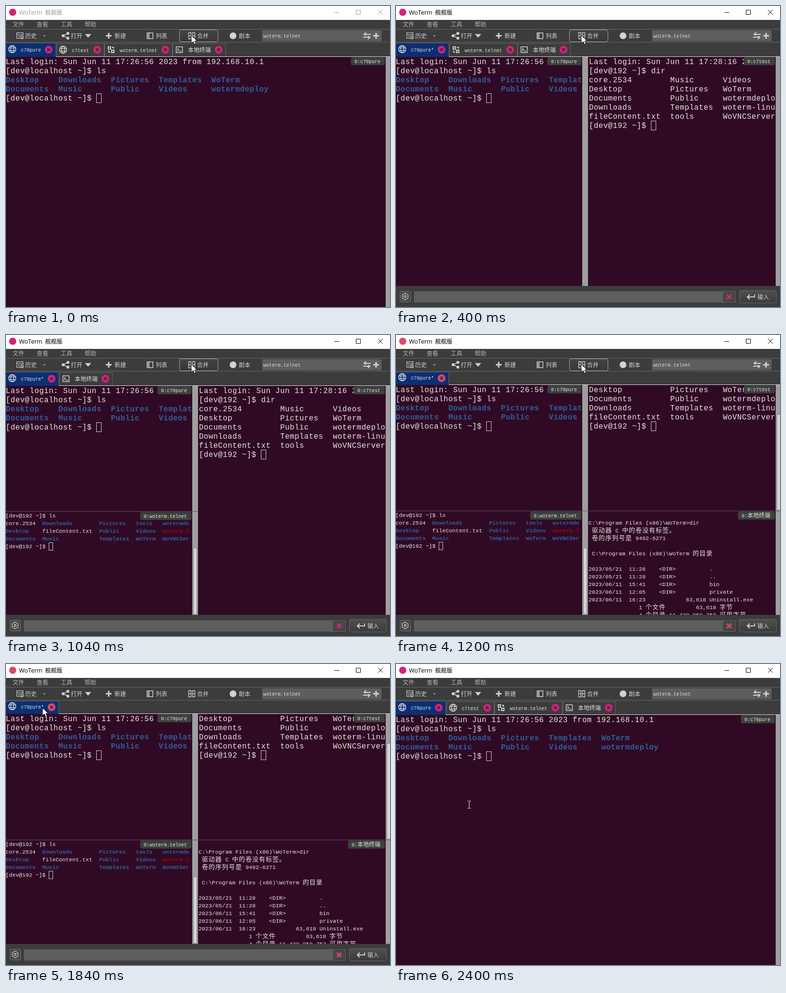
An HTML page with a canvas for the animation above (2800 ms loop, 800 by 627 pixels).

```html
<!DOCTYPE html>
<html lang="zh-CN">
<head>
<meta charset="utf-8">
<title>WoTerm</title>
<style>
html, body { margin: 0; width: 100%; height: 100%; overflow: hidden; background: #3c3c3c; }
canvas { display: block; }
</style>
</head>
<body>
<canvas id="stage" width="800" height="627"></canvas>
<script>
const ctx = document.getElementById('stage').getContext('2d');
const SANS = '"Noto Sans CJK SC", "Noto Sans CJK", sans-serif';
const MONO = '"Liberation Mono", monospace';
const PANEL = '#3c3c3c', EDGE = '#666', INK = '#d2d2d2', NAVY = '#0c2f72';
const TERM = '#300a24', WHITE = '#e6e2e4', BLUE = '#305e9c', BAR = '#9f9f9f';
const STEP = 400, STEPS = 7;
const BIG = { cell: 9.96, size: 15.8, line: 19 };
const SMALL = { cell: 6.96, size: 11.6, line: 16 };
const SHELL = { cell: 7, size: 11.6, line: 16 };
const TINY = { cell: 6, size: 10, line: 12 };
let accent;

// ---- primitives ----
function rect(x, y, w, h, color) {
  ctx.fillStyle = color;
  ctx.fillRect(x, y, w, h);
}
function frame(x, y, w, h, color, width = 1) {
  ctx.strokeStyle = color;
  ctx.lineWidth = width;
  ctx.strokeRect(x + .5, y + .5, w - 1, h - 1);
}
function box(x, y, w, h, r, fill, edge) {
  ctx.beginPath();
  ctx.roundRect(x + .5, y + .5, w - 1, h - 1, r);
  ctx.fillStyle = fill;
  ctx.fill();
  if (edge) { ctx.strokeStyle = edge; ctx.lineWidth = 1; ctx.stroke(); }
}
function shade(y, h, top, bottom) {
  const g = ctx.createLinearGradient(0, y, 0, y + h);
  g.addColorStop(0, top);
  g.addColorStop(1, bottom);
  return g;
}
function path(d, x, y, color = INK, width = 1.5) {
  ctx.save();
  ctx.translate(x, y);
  ctx.strokeStyle = color;
  ctx.lineWidth = width;
  ctx.stroke(new Path2D(d));
  ctx.restore();
}
function shape(d, x, y, color = INK) {
  ctx.save();
  ctx.translate(x, y);
  ctx.fillStyle = color;
  ctx.fill(new Path2D(d));
  ctx.restore();
}
function disc(x, y, r, color) {
  ctx.beginPath();
  ctx.arc(x, y, r, 0, 7);
  ctx.fillStyle = color;
  ctx.fill();
}
function label(text, x, y, color = INK, font = '12px ' + SANS) {
  ctx.font = font;
  ctx.fillStyle = color;
  ctx.fillText(text, x, y);
}
// Character grid: CJK characters take two cells.
function grid(text, x, y, type, color = WHITE, bold = false) {
  ctx.fillStyle = color;
  for (const ch of text) {
    const wide = ch > '\u2e7f';
    ctx.font = wide ? `${type.cell * 2 - (type === TINY ? 0 : 1)}px ${SANS}`
                    : `${bold ? 'bold ' : ''}${type.size}px ${MONO}`;
    ctx.fillText(ch, x, y);
    x += type.cell * (wide ? 2 : 1);
  }
}
function clipped(x, y, w, h, draw) {
  ctx.save();
  ctx.beginPath();
  ctx.rect(x, y, w, h);
  ctx.clip();
  rect(x, y, w, h, TERM);
  draw();
  ctx.restore();
}

// ---- icons, centred on x, y ----
const icons = {
  globe(x, y) {
    path('M-7.5 0A7.5 7.5 0 1 0 7.5 0A7.5 7.5 0 1 0 -7.5 0M-7 -2.7H7M-7 2.7H7M0 -7.5C-4.5 -4 -4.5 4 0 7.5C4.5 4 4.5 -4 0 -7.5', x, y, '#e0e0e0', 1.3);
  },
  link(x, y) {
    path('M-6 -6H-1V-1H-6ZM1 1H6V6H1ZM2 -5H5V-2M-5 2V5H-2', x, y, INK, 2);
  },
  shell(x, y) {
    path('M-6.5 -6H6.5V6H-6.5ZM-4 -3L-1 0L-4 3M0 3H4', x, y);
  },
  plus(x, y) { path('M-6 0H6M0 -6V6', x, y, INK, 3); },
  merge(x, y) {
    path('M-1.5 -6.5H-6.5V6.5H-1.5ZM1.5 -6.5H6.5V6.5H1.5ZM-6 0H-2M6 0H2', x, y, INK, 1.3);
  },
  split(x, y) {
    path('M-6.5 -6.5H-2V6.5H-6.5M6.5 -6.5H2V6.5H6.5M-7 0H-2M7 0H2', x, y, INK, 1.3);
  }
};
function closeButton(x, y) {
  disc(x, y, 8, accent);
  path('M-3 -3L3 3M3 -3L-3 3', x, y, '#3b2434', 1.8);
}

// ---- window chrome ----
function titleBar(active) {
  const ink = active ? '#000' : '#999';
  rect(0, 0, 800, 29, '#fff');
  disc(14, 13, 7.5, accent);
  label('WoTerm', 27, 18, ink, '12.5px "Open Sans", sans-serif');
  label('舰舰版', 81.5, 18, ink);
  path('M684 13.5H694M729.5 8.5H738.5V17.5H729.5ZM775 8L785 18M785 8L775 18', 0, 0, ink, 1);
}
function toolBar(hover) {
  rect(0, 29, 800, 77, PANEL);
  ['文件', '查看', '工具', '帮助'].forEach((s, i) => label(s, 14 + 50 * i, 43, '#b4b4b4'));
  rect(0, 48, 800, 1, EDGE);
  rect(0, 75, 800, 1, EDGE);
  if (hover) box(361, 49, 81, 26, 3, shade(49, 26, '#444', '#363636'), '#aaa');

  path('M6 5.5H-6.5V-6.5H6.5V-1M-6.5 -3H6.5M-4 0H0M-4 3H-1M1 3A3.3 3.3 0 1 0 7.6 3A3.3 3.3 0 1 0 1 3M4 1V3.5H6', 29, 62, INK, 1.2);
  shape('M-3 -1H3L0 2Z', 80, 62, '#999');
  path('M5 -5L-5 0L5 5', 124, 62);
  [[119, 62], [129, 57], [129, 67]].forEach(([x, y]) => disc(x, y, 3, INK));
  shape('M-6.5 -3.5H6.5L0 4Z', 171, 62);
  icons.plus(214, 62);
  path('M-6 -6H6V6H-6ZM-2 -6V6M-5 -3H-3M-5 0H-3M-5 3H-3', 300, 62);
  icons.merge(387, 62);
  disc(473, 62, 7, INK);
  [['历史', 40], ['打开', 135], ['新建', 226], ['列表', 312], ['合并', 398], ['剧本', 485]]
    .forEach(([s, x]) => label(s, x, 66.5));

  box(533, 50, 250, 24, 2, '#5e5e5e');
  grid('woterm.telnet', 536, 66, TINY, '#ddd');
  path('M16 -3H2M6 -7L2 -3L6 -1M0 3H14M10 1L14 3L10 7', 744, 62, INK, 2);
  icons.plus(771, 62);
}
function tabs(list, bottom) {
  let x = 0;
  rect(0, bottom, 800, 1, '#e0e0e0');
  list.forEach(([text, icon, w], i) => {
    const y = bottom - (i ? 14 : 15);
    if (i) {
      rect(x, 78, w, bottom - 78, PANEL);
      path(`M.5 ${bottom}V78.5H${w - .5}V${bottom}`, x, 0, EDGE, 1);
    } else {
      rect(0, 77, w, bottom - 76, NAVY);
      path(`M0 77.5H${w - .5}V${bottom}`, 0, 0, '#4c5c7c', 1);
    }
    icons[icon](x + (i ? 14 : 13), y);
    grid(text, x + (i ? 32 : 31), y + (i ? 5 : 4.5), TINY, '#e2e2e2');
    closeButton(x + w - 15, bottom - (bottom < 105 ? 13 : 14));
    x += w + (i ? 0 : 1);
  });
}
function badge(text, x, right, y) {
  box(x, y, right - x, 18, 4, '#3c403c');
  grid(text, x + 8, y + 13, TINY, '#e6e6e6');
}
function inputPanel() {
  rect(0, 583, 800, 44, PANEL);
  box(8, 594, 23, 23, 2, '#484848', '#777');
  path('M0 -7L6 -3.5V3.5L0 7L-6 3.5V-3.5ZM-2 0A2 2 0 1 0 2 0A2 2 0 1 0 -2 0', 19, 605, INK, 1.3);
  box(37, 594, 671, 24, 2, '#5e5e5e', '#555');
  box(682, 596, 24, 20, 2, '#484848', '#2c2c2c');
  path('M-4.5 -4.5L4.5 4.5M4.5 -4.5L-4.5 4.5', 694, 606, accent, 3);
  box(715, 592, 78, 27, 2, shade(592, 27, '#505050', '#3a3a3a'), '#666');
  path('M16 -5V0H1M6 -5L1 0L6 5', 731, 606, INK, 2);
  label('输入', 753, 611);
}

// ---- terminals ----
function listing(rows, cols, x, y, type, style) {
  rows.forEach((row, r) => row.split(' ').forEach((word, c) => {
    const color = style(word);
    grid(word, x + cols[c] * type.cell, y + r * type.line, type, color, color !== WHITE);
  }));
}
function prompt(host, x, y, type, command) {
  const text = `[dev@${host} ~]$ `;
  grid(text + (command || ''), x, y, type);
  if (!command) {
    const big = type === BIG;
    frame(Math.floor(x + text.length * type.cell), y - (big ? 15 : 12), big ? 11 : 9, big ? 20 : 17, '#d8d0d6');
  }
}
function homePane(w, top, h) {
  clipped(0, top, w, h, () => {
    const x = -.5, y = top + 15;
    grid('Last login: Sun Jun 11 17:26:56 2023 from 192.168.10.1', x, y, BIG);
    prompt('localhost', x, y + 19, BIG, 'ls');
    listing(['Desktop Downloads Pictures Templates WoTerm', 'Documents Music Public Videos wotermdeploy'],
      [0, 11, 22, 32, 43], x, y + 38, BIG, () => BLUE);
    prompt('localhost', x, y + 76, BIG);
  });
}
function dirPane(top, h, scrolledRows) {
  clipped(400, top, 391, h, () => {
    const x = 402, y = top + 15 - 19 * scrolledRows;
    grid('Last login: Sun Jun 11 17:28:16 2023', x, y, BIG);
    prompt('192', x, y + 19, BIG, 'dir');
    listing(['core.2534 Music Videos', 'Desktop Pictures WoTerm', 'Documents Public wotermdeploy',
      'Downloads Templates woterm-linux', 'fileContent.txt tools WoVNCServer'],
      [0, 17, 28], x, y + 38, BIG, () => WHITE);
    prompt('192', x, y + 133, BIG);
  });
}
function telnetPane(top) {
  const plain = ['core.2534', 'fileContent.txt'];
  clipped(0, top, 388, 583 - top, () => {
    const y = top + 12;
    prompt('192', -1, y, SMALL, 'ls');
    listing(['core.2534 Downloads Pictures tools wotermde', 'Desktop fileContent.txt Public Videos woterm-l',
      'Documents Music Templates WoTerm WoVNCSer'], [0, 11, 28, 39, 47], -1, y + 16, SMALL,
      word => plain.includes(word) ? WHITE : word === 'woterm-l' ? '#a40014' : BLUE);
    prompt('192', -1, y + 64, SMALL);
  });
}
const DIR_OUTPUT = `C:\\Program Files (x86)\\WoTerm>dir
 驱动器 C 中的卷没有标签。
 卷的序列号是 9492-6271

 C:\\Program Files (x86)\\WoTerm 的目录

2023/05/21  11:28    <DIR>          .
2023/05/21  11:28    <DIR>          ..
2023/06/11  15:41    <DIR>          bin
2023/06/11  12:05    <DIR>          private
2023/06/11  16:23            63,618 Uninstall.exe
               1 个文件         63,618 字节
               4 个目录 11,430,858,752 可用字节`.split('\n');
function localPane() {
  clipped(400, 367, 391, 216, () =>
    DIR_OUTPUT.forEach((line, i) => grid(line, 401, 395 + 16 * i, SHELL)));
}
function scrollBar(x, y, w, h, handleY) {
  rect(x, y, w, h, BAR);
  if (handleY) box(x + 2, handleY, 8, y + h - handleY - 1, 2, '#d6d6d6', '#808080');
}

// ---- overlays ----
function contextMenu() {
  ctx.save();
  ctx.shadowColor = '#000a';
  ctx.shadowBlur = 5;
  ctx.shadowOffsetX = ctx.shadowOffsetY = 2;
  rect(75, 91, 178, 307, PANEL);
  ctx.restore();
  frame(75, 91, 178, 307, '#333');
  rect(81, 285, 165, 27, NAVY);
  ['关闭这选项卡', '关闭其它选项卡', '新建同名会话', '复制主机地址', '编辑会话', '浮动此选项',
    '合并右则选项卡', '分离子窗口', '打开SFTP助手', '复用SFTP会话', '复用SSH会话']
    .forEach((s, i) => label(s, 132, 114 + 27 * i));
  icons.merge(90, 271);
  icons.split(90, 298);
}
function pointer(x, y) {
  const arrow = 'M0 0V16.5L4 13L6.5 19L9.5 17.7L7 12H12Z';
  shape(arrow, x, y, '#fff');
  path(arrow, x, y, '#000', 1);
}

const TABS = [['c7test', 'globe', 100], ['woterm.telnet', 'link', 142], ['本地终端', 'shell', 111]];

function draw(step) {
  const merged = step === 6 ? 0 : Math.min(step, 3);
  const full = merged === 3;
  const bottom = full ? 103 : 105, top = bottom + 1;
  const middle = full ? 366 : 367;
  accent = full ? '#dc4a6c' : '#d4237a';

  titleBar(step > 0);
  toolBar(step < 4);
  tabs([merged ? ['c70pure*', 'globe', 110] : ['c70pure', 'globe', 104], ...TABS.slice(merged)], bottom);

  if (!merged) {
    homePane(791, top, 627 - top);
    scrollBar(791, top, 9, 627 - top);
    badge('0:c70pure', 718, 790, 106);
  } else {
    const split = merged > 1;
    homePane(388, top, (split ? middle : 583) - top);
    dirPane(top, (full ? middle : 583) - top, full ? 3 : 0);
    scrollBar(388, top, 12, 583 - top);
    scrollBar(791, top, 9, (full ? middle : 583) - top, full && 165);
    if (split) {
      telnetPane(middle + 1);
      scrollBar(388, middle + 1, 12, 582 - middle, 443);
      rect(0, middle, full ? 800 : 400, 1, '#555');
      badge('0:woterm.telnet', 279, 387, middle + 1);
    }
    if (full) {
      localPane();
      scrollBar(791, 367, 9, 216);
      badge('0:本地终端', 712, 790, 367);
    }
    badge('0:c70pure', 315, 387, top);
    badge('0:c7test', 724, 790, top);
    inputPanel();
  }

  if (step === 5) contextMenu();
  if (step < 4) pointer(386, 61);
  else if (step === 4) pointer(76, 91);
  else if (step === 5) pointer(151, 291);
  else path('M-3.5 -7.5H-1L0 -7L1 -7.5H3.5M0 -7V7M-3.5 7.5H-1L0 7L1 7.5H3.5', 152.5, 293, '#eee', 1);
}

function tick() {
  draw(Math.floor(performance.now() / STEP) % STEPS);
  requestAnimationFrame(tick);
}
tick();
</script>
</body>
</html>
```
